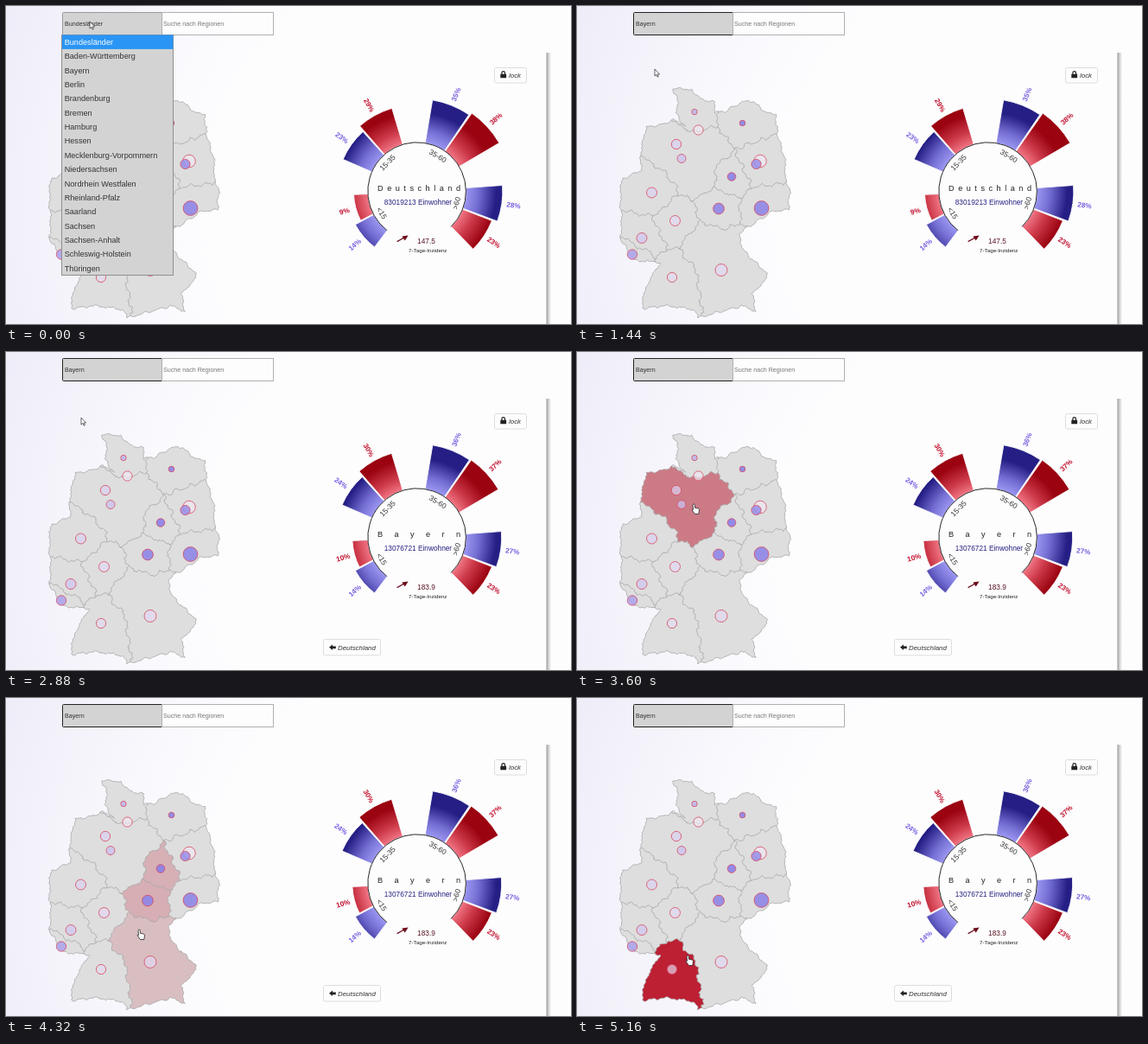
Recreate the animation shown at these times as an HTML page. Size 654 px wide and 368 px high, loop 5400 ms.

```html
<!DOCTYPE html>
<html lang="de">
<head>
<meta charset="utf-8">
<title>Bundesländer</title>
<style>
  html, body { margin: 0; width: 100%; height: 100%; overflow: hidden; background: #fcfcfe; }
  svg { display: block; width: 654px; height: 368px; }
  text { font-family: "Liberation Sans", Arial, sans-serif; fill: #333; }
  .mid { text-anchor: middle; }
  .small { font-size: 7.15px; }
  .btn rect { fill: #fdfdfe; stroke: #ddd; }
  .btn text { font-size: 7.9px; font-style: italic; }
  .btn path { fill: #222; }
</style>
</head>
<body>
<svg viewBox="0 0 654 368" xmlns="http://www.w3.org/2000/svg">
  <defs>
    <radialGradient id="bg" gradientUnits="userSpaceOnUse" cx="520" cy="230" r="560">
      <stop offset=".5" stop-color="#fdfdfe"/><stop offset=".7" stop-color="#f9f8fd"/>
      <stop offset="1" stop-color="#efedf8"/>
    </radialGradient>
    <linearGradient id="edge">
      <stop offset="0" stop-color="#999"/><stop offset=".4" stop-color="#ccc"/><stop offset="1" stop-color="#fdfdfe"/>
    </linearGradient>
    <radialGradient id="blue" gradientUnits="userSpaceOnUse" cx="0" cy="0" r="112">
      <stop offset=".51" stop-color="#9a96f0"/><stop offset=".64" stop-color="#736dd2"/>
      <stop offset=".82" stop-color="#251f85"/>
    </radialGradient>
    <radialGradient id="red" gradientUnits="userSpaceOnUse" cx="0" cy="0" r="112">
      <stop offset=".51" stop-color="#f07483"/><stop offset=".64" stop-color="#cd3a4a"/>
      <stop offset=".82" stop-color="#9b0311"/>
    </radialGradient>
    <clipPath id="inside"><path id="shape"/></clipPath>
  </defs>

  <rect width="654" height="368" fill="url(#bg)"/>
  <rect x="625.5" y="54" width="5.5" height="314" fill="url(#edge)"/>

  <g id="map" stroke-linejoin="round"></g>

  <g class="btn">
    <rect x="565.5" y="71.5" width="37" height="17.5" rx="2"/>
    <path d="M572.3 78.8h1v-1.3a2.4 2.4 0 0 1 4.8 0v1.3h1v4.5h-6.8zm2.2 0h2.4v-1.3a1.2 1.2 0 0 0-2.4 0z"/>
    <text x="582" y="82.5">lock</text>
  </g>
  <g class="btn" id="back">
    <rect x="367.5" y="332.5" width="66" height="18.5" rx="2"/>
    <path d="M374 341.7l4-3.3v2h3.8v2.8h-3.8v1.9z"/>
    <text x="384" y="344.7">Deutschland</text>
  </g>

  <g id="chart" transform="translate(475.6 214.6)">
    <text x="-9.6" y="70.4" style="font-size:6.25px;fill:#222">7-Tage-Inzidenz</text>
  </g>

  <rect id="box" x="65.5" y="7.5" width="116" height="26" rx="1" fill="#d3d3d3"/>
  <rect x="180.5" y="7.5" width="129" height="26" fill="#fdfdfe" stroke="#b0b0b0"/>
  <text class="small" x="182" y="22.6" style="fill:#777">Suche nach Regionen</text>
  <text class="small" id="choice" x="68" y="22.6"></text>

  <g id="list">
    <rect x="64.5" y="33.5" width="129" height="278" fill="#d3d3d3" stroke="#8f8f8f"/>
    <rect id="mark" x="65" y="33.5" width="128.5" height="16.4" fill="#2a95f5"/>
  </g>

  <g id="cursor" stroke="#222" stroke-width=".8" fill="#fff" stroke-linejoin="round">
    <path id="arrow" transform="scale(.85)" d="M0 0v9.5l2.2-2 1.5 3.3 1.4-.6-1.5-3.2h3z"/>
    <path id="hand" d="M2.2 0c.8 0 1.2.5 1.2 1.2v3l4 .9c.8.2 1.2.8 1.1 1.7l-.7 4.7h-4.4l-3.2-4.6c-.3-.9.8-1.3 1.3-.4l-.4-5.3c0-.7.3-1.2 1.1-1.2z"/>
  </g>
</svg>

<script>
const $ = id => document.getElementById(id);

function add(parent, tag, attrs, text) {
  const el = document.createElementNS('http://www.w3.org/2000/svg', tag);
  for (const k in attrs) el.setAttribute(k, attrs[k]);
  if (text) el.textContent = text;
  parent.appendChild(el);
  return el;
}

// ---- map: each state is the area nearest to its sites, with wavy borders ----
const coast = `124,138 114,123 118,112 111,96 131,96 143,108 160,111 158,123 172,122 192,111 205,110 217,123
  230,125 232,148 242,184 240,196 246,212 245,236 228,237 187,263 192,281 219,310 219,318 203,333 207,353
  190,347 141,361 135,351 104,347 75,350 79,327 96,297 65,294 50,268 52,250 50,222 52,200 74,190 74,167
  80,140 103,136 110,131`.split(/\s+/).map(p => p.split(',').map(Number));

// state, centre, radius, depth of colour
const bubbles = [
  ['SH', 136, 122.5, 3.2, .5], ['MV', 191.5, 135.5, 3.3, .95], ['HH', 140.5, 143.5, 5.6, 0],
  ['NI', 115, 160, 5.7, .2], ['NI', 121, 176.5, 5, .35], ['BE', 212, 179.5, 7.3, 0],
  ['BB', 207.5, 183, 5.6, .8], ['ST', 179, 197.5, 4.8, .95], ['NW', 86.5, 216, 6, .2],
  ['SN', 213.5, 234, 8.4, .9], ['TH', 164, 234.5, 6.4, .9], ['HE', 113.5, 248.5, 6, .15],
  ['RP', 75, 268.5, 6, .3], ['SL', 64, 287.5, 5.7, .65], ['BW', 110, 314, 5.6, .12], ['BY', 167, 305.5, 7, .15]
];
const sites = bubbles.filter(b => b[0] !== 'HH' && b[0] !== 'BE')
  .concat([['NI', 142, 195], ['NI', 150, 166], ['BY', 150, 275], ['BY', 178, 280]])
  .map(([state, x, y]) => ({ state, x, y }));

const nearest = (x, y) => sites.reduce((a, b) =>
  Math.hypot(b.x - x, b.y - y) < Math.hypot(a.x - x, a.y - y) ? b : a).state;

const wavy = ([x, y], k) => [
  x + k * (1.8 * Math.sin(.31 * y + .17 * x) + Math.sin(1.1 * y - .6 * x)),
  y + k * (1.8 * Math.sin(.35 * x - .13 * y + 1) + Math.sin(.9 * x + .7 * y))
];
function edge(a, b, k) {
  const n = Math.ceil(Math.hypot(b[0] - a[0], b[1] - a[1]) / 1.5) || 1;
  return Array.from({ length: n + 1 }, (_, i) =>
    wavy([a[0] + (b[0] - a[0]) * i / n, a[1] + (b[1] - a[1]) * i / n], k));
}
const line = pts => 'M' + pts.map(p => p.map(v => v.toFixed(1)).join(' ')).join('L');
const ring = (pts, k) => line(pts.flatMap((p, i) => edge(p, pts[(i + 1) % pts.length], k))) + 'Z';

// corners of a cell; each knows the neighbour across the edge that starts there
function cell(s) {
  let poly = [[30, 70], [270, 70], [270, 380], [30, 380]].map(p => ({ p }));
  for (const o of sites) {
    if (o === s) continue;
    const side = ({ p }) => (p[0] - (s.x + o.x) / 2) * (o.x - s.x) + (p[1] - (s.y + o.y) / 2) * (o.y - s.y);
    poly = poly.flatMap((a, i) => {
      const b = poly[(i + 1) % poly.length], da = side(a), db = side(b);
      const out = da <= 0 ? [a] : [];
      if (da <= 0 !== db <= 0) {
        const f = da / (da - db);
        out.push({ p: [0, 1].map(c => a.p[c] + (b.p[c] - a.p[c]) * f), next: da <= 0 ? o : a.next });
      }
      return out;
    });
  }
  return poly;
}

const map = $('map'), land = ring(coast, .55), fills = {};
let borders = '';
$('shape').setAttribute('d', land);
add(map, 'path', { d: land, fill: '#dedede' });
const area = add(map, 'g', { 'clip-path': 'url(#inside)' });
for (const s of sites) {
  const c = cell(s);
  fills[s.state] = (fills[s.state] || '') + ring(c.map(v => v.p), 1);
  c.forEach(({ p, next }, i) => {
    if (next && next.state > s.state) borders += line(edge(p, c[(i + 1) % c.length].p, 1));
  });
}
for (const k in fills) fills[k] = add(area, 'path', { d: fills[k], fill: '#bd1f33' });
const ink = { fill: 'none', stroke: '#a6a6a6', 'stroke-width': .8 };
add(area, 'path', { d: borders, ...ink });
add(map, 'path', { d: land, ...ink });
for (const [, cx, cy, r, k] of bubbles) add(map, 'circle', {
  cx, cy, r, stroke: '#d8485f', 'stroke-width': .8,
  fill: `rgb(${240 - 110 * k},${232 - 112 * k},${244 - 14 * k})`, 'fill-opacity': .65 + .25 * k
});

// ---- chart ----
const at = (deg, r) => {
  const a = deg * Math.PI / 180;
  return `${(r * Math.cos(a)).toFixed(2)} ${(r * Math.sin(a)).toFixed(2)}`;
};
const START = 127.3, PITCH = 76.2, WIDE = 24.4, R = 56.8;
const chart = $('chart');

function wedge(g, from, v, blue) {
  const to = from + WIDE, r = Math.sqrt(R * R + 237 * v), mid = from + WIDE / 2;
  add(g, 'path', {
    d: `M${at(from, R)}L${at(from, r)}A${r} ${r} 0 0 1 ${at(to, r)}L${at(to, R)}A${R} ${R} 0 0 0 ${at(from, R)}Z`,
    fill: `url(#${blue ? 'blue' : 'red'})`, stroke: '#fdfdfe', 'stroke-width': .9
  });
  add(g, 'text', {
    class: 'mid', y: 3, transform: `translate(${at(mid, r + 13.7)}) rotate(${mid < 270 ? mid - 180 : mid})`,
    style: `font-size:8.2px;font-weight:bold;fill:${blue ? '#7a5fe0' : '#c2122f'}`
  }, v + '%');
}

function panel(name, gap, people, rate, values) {
  const g = add(chart, 'g', {});
  values.forEach((v, i) => wedge(g, START + PITCH * (i >> 1) + i % 2 * 25.4, v, i % 2 === 0));
  ['<15', '15-35', '35-60', '>60'].forEach((s, i) => {
    const a = 148.5 + 76 * i, turn = a + (i < 1 || i > 2 ? -90 : 90);
    add(g, 'text', { class: 'mid', y: 3, transform: `translate(${at(a, 47.7)}) rotate(${turn})`, style: 'font-size:8.5px' }, s);
  });
  add(g, 'text', { x: -45.6, y: -.3, style: `font-size:9.2px;letter-spacing:${gap}px;fill:#222` }, name);
  add(g, 'text', { x: -37.9, y: 15.4, style: 'font-size:8.3px;fill:#26217f' }, people + ' Einwohner');
  add(g, 'text', { class: 'mid', x: 10.9, y: 60.4, style: 'font-size:8.3px;fill:#5a1523' }, rate);
  add(g, 'path', { d: 'M-23 58L-14.6 53.4', stroke: '#6b0a1a', 'stroke-width': 1.2 });
  add(g, 'path', { d: 'M-10 51l-7.2 .8 3.3 5.2z', fill: '#6b0a1a' });
  add(g, 'path', { d: `M${at(START, R)}A${R} ${R} 0 1 1 ${at(406, R)}`, fill: 'none', stroke: '#111', 'stroke-width': .9 });
  return g;
}
const country = panel('Deutschland', 4.5, '83019213', '147.5', [14, 9, 23, 29, 35, 38, 28, 23]);
const state = panel('Bayern', 13.4, '13076721', '183.9', [14, 10, 24, 30, 36, 37, 27, 23]);

// ---- list ----
const ROW = 16.37;
const items = ['Bundesländer', 'Baden-Württemberg', 'Bayern', 'Berlin', 'Brandenburg', 'Bremen', 'Hamburg', 'Hessen',
  'Mecklenburg-Vorpommern', 'Niedersachsen', 'Nordrhein Westfalen', 'Rheinland-Pfalz', 'Saarland', 'Sachsen',
  'Sachsen-Anhalt', 'Schleswig-Holstein', 'Thüringen'].map((s, i) =>
  add($('list'), 'text', { x: 67.7, y: 44.8 + i * ROW, style: 'font-size:9.15px' }, s));

// ---- time ----
const LOOP = 5400, STEP = 120, LAST = 5160, CLOSE = 1440, SWAP = 1560, ENTER = 3360;
const path = [[0, 97, 18], [720, 94, 26], [1080, 90, 73], [1920, 90, 73], [2880, 87, 76], [3360, 118, 146],
  [3600, 133, 176], [3720, 166, 184], [3960, 175, 206], [4320, 152, 268], [4560, 130, 298], [5160, 126, 298]];

function mouse(t) {
  const i = path.findIndex(k => k[0] > t);
  if (i < 0) return path[path.length - 1].slice(1);
  const a = path[i - 1], b = path[i], f = (t - a[0]) / (b[0] - a[0]);
  return [1, 2].map(c => a[c] + (b[c] - a[c]) * f);
}

// a state reddens while the pointer is over it, and pales more slowly
function tint(name, t) {
  let k = 0;
  for (let u = ENTER; u <= t; u += STEP)
    k = Math.min(1, Math.max(0, k + (nearest(...mouse(u)) === name ? .17 : -.09)));
  return k;
}
const show = (el, on) => el.setAttribute('visibility', on ? 'visible' : 'hidden');

function draw(t) {
  const [x, y] = mouse(t), open = t < CLOSE, onMap = t >= ENTER;
  $('cursor').setAttribute('transform', `translate(${x} ${y})`);
  show($('arrow'), !onMap);
  show($('hand'), onMap);

  const row = Math.max(0, Math.floor((y - 33.5) / ROW));
  show($('list'), open);
  $('mark').setAttribute('y', 33.5 + row * ROW);
  items.forEach((el, i) => el.style.fill = i === row ? '#fff' : '#333');
  $('choice').textContent = open ? 'Bundesländer' : 'Bayern';
  $('box').setAttribute('stroke', open ? '#999' : '#222');

  show($('back'), t >= SWAP);
  show(country, t < SWAP);
  state.setAttribute('opacity', Math.min(1, Math.max(0, (t - SWAP) / 640)));
  for (const k in fills) fills[k].setAttribute('opacity', tint(k, t));
}

const begin = performance.now();
function tick() {
  const t = (performance.now() - begin) % LOOP;
  draw(Math.min(LAST, Math.floor(t / STEP) * STEP));
  requestAnimationFrame(tick);
}
tick();
</script>
</body>
</html>
```
